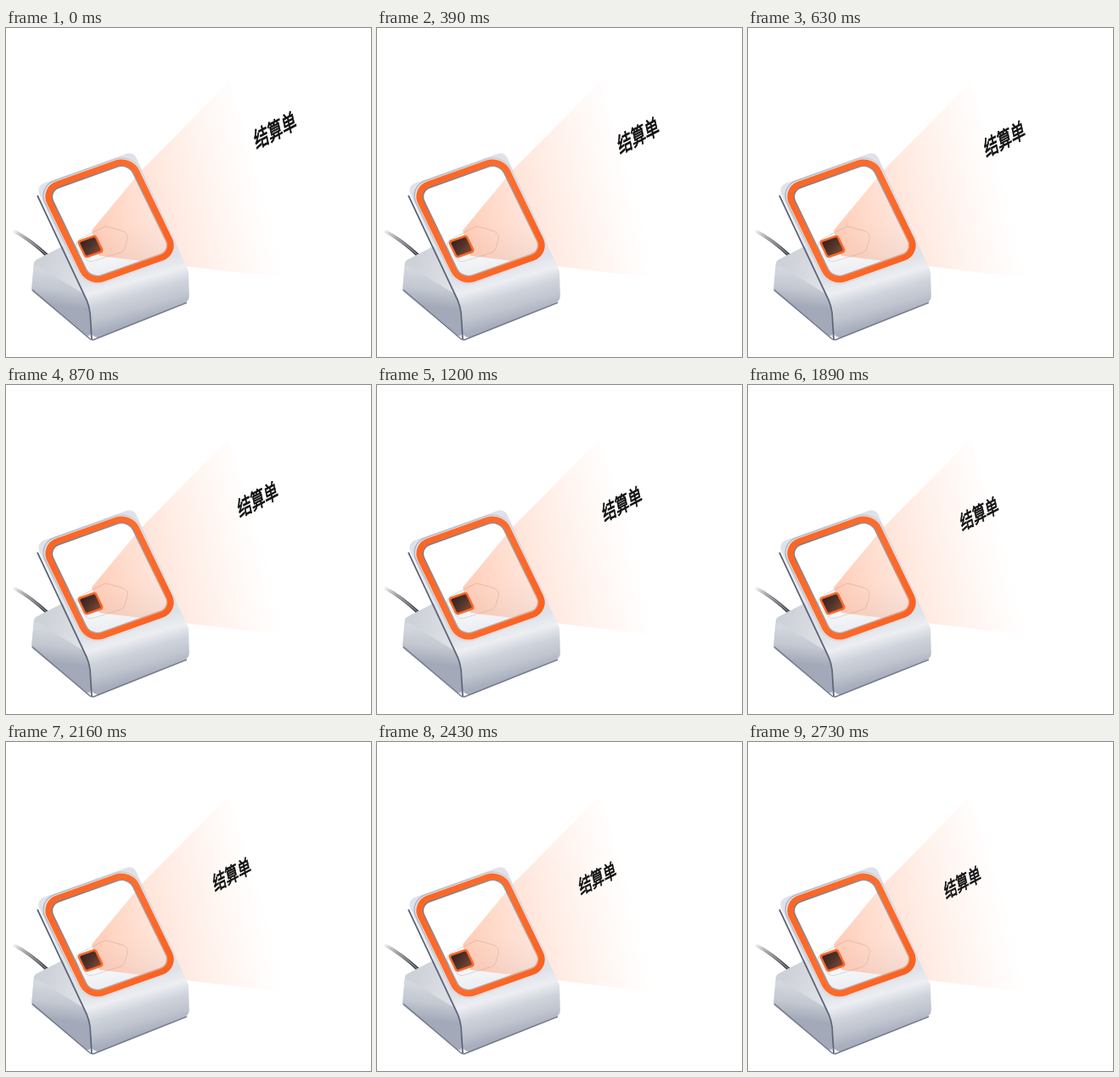
Write an HTML page with a canvas that moves like this. It is 430 by 387 pixels and loops after 3.7 s.

```html
<!DOCTYPE html>
<html lang="zh-CN">
<head>
<meta charset="utf-8">
<title>结算单</title>
<style>
html, body { margin: 0; width: 100%; height: 100%; overflow: hidden; background: #fff; }
canvas { display: block; width: 430px; height: 387px; }
</style>
</head>
<body>
<canvas id="stage"></canvas>
<script>
const W = 430, H = 387, LOOP = 3700, STEP = 30, STEPS = 91;
const PANEL = { x: 122, y: 227, w: 115.5, h: 130.5, rim: 8 };
const canvas = document.getElementById('stage');
const ratio = window.devicePixelRatio || 1;
canvas.width = W * ratio;
canvas.height = H * ratio;
const ctx = canvas.getContext('2d');

// Path through corner points, all rounded by the same radius.
function polygon(points, radius = 0) {
  const n = points.length, last = points[n - 1];
  const path = new Path2D();
  path.moveTo((last[0] + points[0][0]) / 2, (last[1] + points[0][1]) / 2);
  points.forEach(([x, y], i) => path.arcTo(x, y, ...points[(i + 1) % n], radius));
  path.closePath();
  return path;
}

// Rounded rectangle tilted like the panel.
function tilted(x, y, w, h, radius) {
  const flat = new Path2D(), path = new Path2D();
  flat.roundRect(-w / 2, -h / 2, w, h, radius);
  path.addPath(flat, new DOMMatrix([.944, -.334, .437, .9, x, y]));
  return path;
}

function panelRect(inset, radius) {
  return tilted(PANEL.x, PANEL.y, PANEL.w - 2 * inset, PANEL.h - 2 * inset, radius);
}

// Linear gradient with evenly spaced colours.
function fade(x0, y0, x1, y1, ...colors) {
  const g = ctx.createLinearGradient(x0, y0, x1, y1);
  colors.forEach((color, i) => g.addColorStop(i / (colors.length - 1), color));
  return g;
}

function fill(path, paint) {
  ctx.fillStyle = paint;
  ctx.fill(path, 'evenodd');
}

function stroke(path, paint, width) {
  ctx.strokeStyle = paint;
  ctx.lineWidth = width;
  ctx.stroke(path);
}

const opening = panelRect(PANEL.rim, 13);
const rim = panelRect(PANEL.rim / 2, 17);
const shell = polygon([[35, 186], [150, 145], [215, 286], [216, 321], [101, 368], [97, 324]], 9);
shell.addPath(opening);
const body = polygon([[33, 274], [72, 254], [125, 264], [101, 368], [30, 309]], 5);
const side = polygon([[33, 277], [97, 316], [101, 367], [30, 309]], 4);
const plate = polygon([[78, 253], [117, 233], [145, 241], [139, 263], [97, 276]], 8);
const beam = polygon([[101, 238], [159, 168], [262, 64], [336, 295], [110, 268]]);
const cable = new Path2D('M8 238Q29 249 50 269');
const leftEdge = new Path2D('M37 197L95 320Q98 327 99 335L101 366');
const bottomEdge = new Path2D('M31 308L98 365Q101 368 105 366L213 323');

function drawBase() {
  stroke(cable, fade(8, 238, 48, 268, 'rgba(80,80,85,0)', '#85868c', '#35363b'), 4);
  stroke(cable, fade(8, 238, 48, 268, 'rgba(220,220,225,0)', '#a9aab1'), 1);
  fill(body, fade(45, 268, 110, 290, '#cdd1d8', '#e4e6ea'));
  fill(side, fade(50, 285, 45, 325, '#d3d7de', '#c3c8d1', '#a3a9b8'));
}

function drawWindow() {
  ctx.save();
  ctx.clip(opening);
  fill(opening, fade(110, 235, 120, 300, '#fff', '#f6f7f9', '#e6e8ec'));
  stroke(plate, '#d3d5da', .9);
  ctx.restore();
}

function drawBeam() {
  fill(beam, fade(105, 252, 310, 205,
    'rgba(255,126,72,.4)', 'rgba(255,136,86,.28)', 'rgba(255,148,102,.18)',
    'rgba(255,160,120,.09)', 'rgba(255,190,160,0)'));
}

function drawShell() {
  fill(shell, fade(147, 283, 164, 343, '#dfe2e8', '#eceef2', '#cfd3db', '#c0c5cf', '#a8aebd'));
  stroke(leftEdge, '#5f6679', 1.8);
  stroke(bottomEdge, '#747b8d', 1.5);
  stroke(panelRect(-1.5, 21), fade(40, 190, 205, 285, '#a5aab6', '#d4d7de', '#dfe2e8'), 1.2);
  stroke(rim, fade(50, 180, 190, 285, '#fb6525', '#ff6e2e', '#f9601f'), PANEL.rim);
  stroke(opening, fade(60, 185, 175, 280, '#777b88', '#9a9da8', '#e2a58c'), 1.4);
}

function drawSensor() {
  fill(tilted(99.5, 257, 24, 23, 4), '#fa6a2c');
  fill(tilted(99.5, 257, 19, 18, 2), fade(88, 248, 111, 267, '#301f1e', '#51332b', '#8d4c35'));
}

// The label slides down-left and shrinks, linearly.
function drawLabel(k) {
  const s = 1 - .13 * k;
  ctx.save();
  ctx.translate(317 - 64.5 * k, 120 + 45 * k);
  ctx.transform(.81 * s, -.42 * s, .28 * s, 1.28 * s, 0, 0);
  ctx.font = '400 20px "Noto Sans CJK SC", "Noto Sans CJK JP", sans-serif';
  ctx.textAlign = 'center';
  ctx.textBaseline = 'middle';
  ctx.fillStyle = ctx.strokeStyle = '#111';
  ctx.lineWidth = .7;
  ctx.fillText('结算单', 0, 0);
  ctx.strokeText('结算单', 0, 0);
  ctx.restore();
}

function draw(time) {
  const step = Math.min(STEPS, Math.floor((time % LOOP) / STEP));
  ctx.setTransform(ratio, 0, 0, ratio, 0, 0);
  ctx.fillStyle = '#fff';
  ctx.fillRect(0, 0, W, H);
  drawBase();
  drawWindow();
  drawBeam();
  drawShell();
  drawSensor();
  drawLabel(step / STEPS);
}

const start = performance.now();
function tick() {
  draw(performance.now() - start);
  requestAnimationFrame(tick);
}
tick();
</script>
</body>
</html>
```
